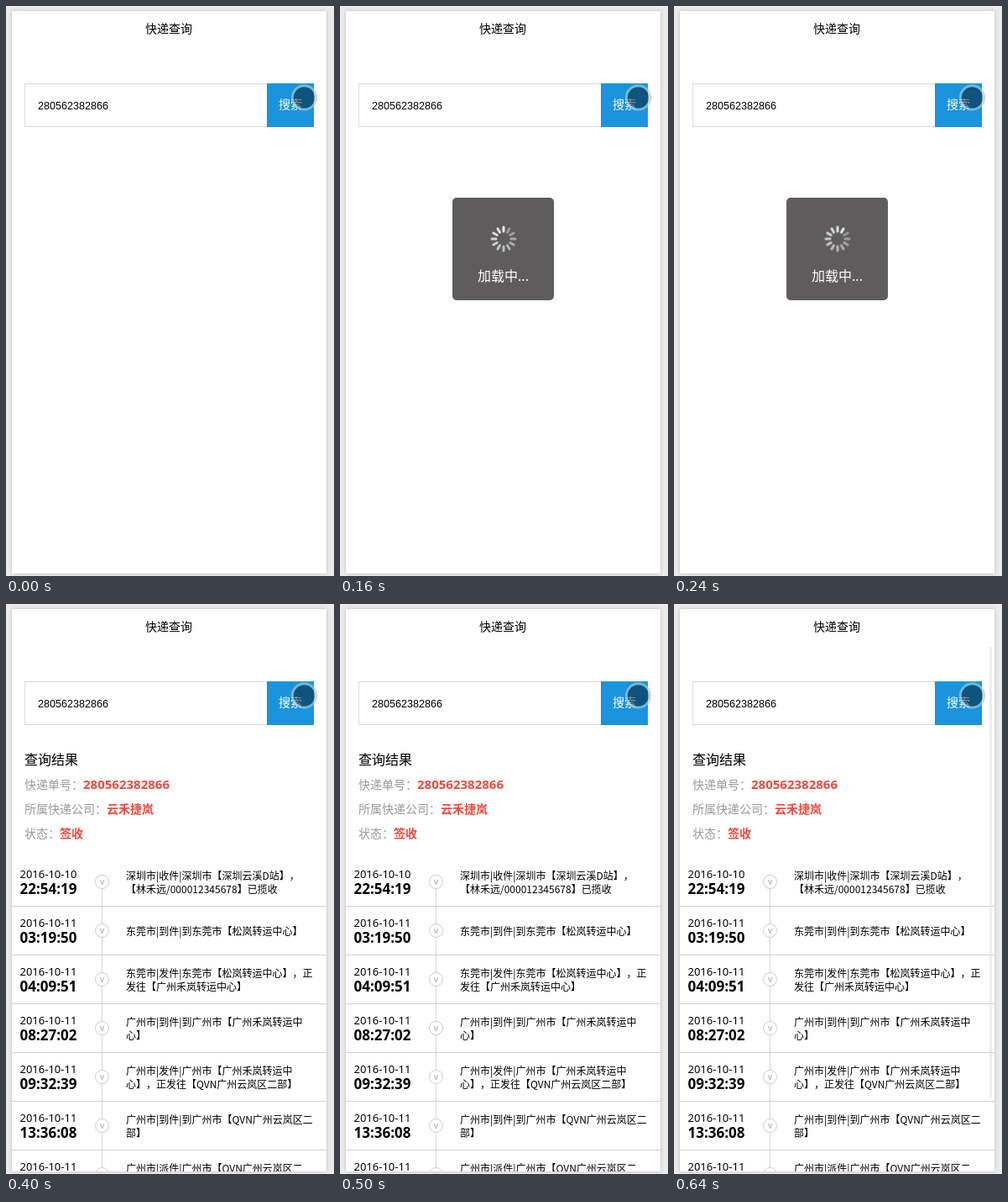
These frames come from a looping animation (391 px wide and 678 px high, 800 ms). An HTML page:

```html
<!DOCTYPE html>
<html lang="zh-CN">
<head>
<meta charset="utf-8">
<title>快递查询</title>
<style>
  html, body { margin: 0; width: 100%; height: 100%; overflow: hidden; background: #ebebeb; }
  .page { position: absolute; left: 7px; top: 6px; width: 375px; height: 669px; background: #fff; box-shadow: 0 0 4px rgba(60, 40, 60, .25); }
  svg { position: absolute; left: 0; top: 0; display: block; }
  text { font: 14px "Noto Sans CJK SC", "Noto Sans CJK", "Noto Sans", sans-serif; text-spacing-trim: space-all; white-space: pre; }
  text.number { font: 12.6px "Liberation Sans", sans-serif; }
  text.heading { font-size: 16px; }
  text.button { font-weight: 500; fill: #fff; }
  .label { fill: #999; }
  .value { fill: #f4483c; font-weight: 700; }
  .value.digits { font: 700 15px "Noto Sans", sans-serif; }
  text.entry { font-size: 12px; }
  text.date { font: 13px "Noto Sans", sans-serif; }
  text.time { font: 700 17px "Noto Sans", sans-serif; }
  text.mark { font: 700 10px "Noto Sans", sans-serif; fill: #c2c2c2; text-anchor: middle; }
  text.loading { font: 16px "Noto Sans", "Noto Sans CJK SC", "Noto Sans CJK", sans-serif; fill: #fff; text-anchor: middle; }
  #loader, #results, #scrollbar { opacity: 0; }
</style>
</head>
<body>
<div class="page"></div>
<svg width="391" height="678" viewBox="0 0 391 678">
  <defs><clipPath id="pageClip"><rect x="7" y="6" width="375" height="669"/></clipPath></defs>

  <text x="166" y="32">快递查询</text>
  <rect x="22.5" y="92.5" width="289" height="51" fill="#fff" stroke="#dedada"/>
  <text class="number" x="38" y="123">280562382866</text>
  <rect x="311" y="92" width="56" height="52" fill="#1a94dc"/>
  <text class="button" x="325" y="122">搜索</text>
  <circle cx="355.5" cy="109" r="12.8" fill="rgba(0,0,0,.43)"/>
  <circle cx="355.5" cy="109" r="14.2" fill="none" stroke="rgba(170,200,212,.65)" stroke-width="3"/>

  <g id="results" clip-path="url(#pageClip)">
    <text class="heading" x="22" y="191">查询结果</text>
    <text x="22" y="220"><tspan class="label">快递单号&#xFF1A;</tspan><tspan class="value digits">280562382866</tspan></text>
    <text x="22" y="249"><tspan class="label">所属快递公司&#xFF1A;</tspan><tspan class="value">云禾捷岚</tspan></text>
    <text x="22" y="278"><tspan class="label">状态&#xFF1A;</tspan><tspan class="value">签收</tspan></text>
    <path d="M114.5 338V675" stroke="#dcd6dc"/>
    <g id="rows"></g>
  </g>
  <rect id="scrollbar" x="376" y="51" width="3" height="537" rx="1" fill="#dfdee2"/>

  <g id="loader">
    <rect x="134" y="228" width="121" height="122" rx="5" fill="#5f5c5e"/>
    <g transform="translate(195 277)"><g id="spinner"></g></g>
    <text class="loading" x="194.5" y="327">加载中...</text>
  </g>
</svg>
<script>
const LOOP = 800;
const ROW_HEIGHT = 58;
const COMMA = "\uFF0C";
const $ = id => document.getElementById(id);

function add(parent, tag, attrs, content = "") {
  const node = document.createElementNS("http://www.w3.org/2000/svg", tag);
  for (const [key, value] of Object.entries(attrs)) node.setAttribute(key, value);
  node.textContent = content;
  return parent.appendChild(node);
}

const hub = "广州禾岚转运中";
const depot = "QVN广州云岚区二";
const entries = [
  ["10", "22:54:19", `深圳市|收件|深圳市【深圳云溪D站】${COMMA}`, "【林禾远/000012345678】已揽收"],
  ["11", "03:19:50", "东莞市|到件|到东莞市【松岚转运中心】"],
  ["11", "04:09:51", `东莞市|发件|东莞市【松岚转运中心】${COMMA}正`, `发往【${hub}心】`],
  ["11", "08:27:02", `广州市|到件|到广州市【${hub}`, "心】"],
  ["11", "09:32:39", `广州市|发件|广州市【${hub}`, `心】${COMMA}正发往【${depot}部】`],
  ["11", "13:36:08", `广州市|到件|到广州市【${depot}`, "部】"],
  ["11", "", `广州市|派件|广州市【${depot}`, "部】"]
];

entries.forEach(([day, time, ...lines], i) => {
  const row = add($("rows"), "g", { transform: `translate(0 ${301 + i * ROW_HEIGHT})` });
  add(row, "text", { class: "date", x: 16.5, y: 24.5 }, `2016-10-${day}`);
  add(row, "text", { class: "time", x: 16.5, y: 44 }, time);
  add(row, "circle", { cx: 114.5, cy: 29.5, r: 8, fill: "#fff", stroke: "#cbcbcb" });
  add(row, "text", { class: "mark", x: 114.5, y: 33 }, "v");
  const firstLine = lines.length > 1 ? 26.5 : 34.5;
  lines.forEach((line, n) => add(row, "text", { class: "entry", x: 143, y: firstLine + n * 16 }, line));
  add(row, "path", { d: "M7 58.5H382", stroke: "#d2d2d2" });
});

// Spokes brighten clockwise; the first one is the head.
for (let i = 0; i < 12; i++) {
  const grey = 144 + 7.5 * (i || 12);
  add($("spinner"), "rect", {
    x: -1.5, y: -15.5, width: 3, height: 8, rx: 1.5,
    fill: `rgb(${grey},${grey},${grey})`, transform: `rotate(${i * 30})`
  });
}

// Each step is [start in ms, value], held until the next one.
function hold(id, property, steps) {
  const frames = steps.map(([at, value]) => ({ offset: at / LOOP, [property]: value, easing: "step-end" }));
  frames.push({ offset: 1, [property]: steps.at(-1)[1] });
  $(id).animate(frames, { duration: LOOP, iterations: Infinity });
}

hold("loader", "opacity", [[0, 0], [160, 1], [400, 0]]);
hold("spinner", "transform", [[0, "rotate(0deg)"], [240, "rotate(30deg)"]]);
hold("results", "opacity", [[0, 0], [400, 1]]);
hold("scrollbar", "opacity", [[0, 0], [560, 1], [640, 0.55]]);
</script>
</body>
</html>
```
